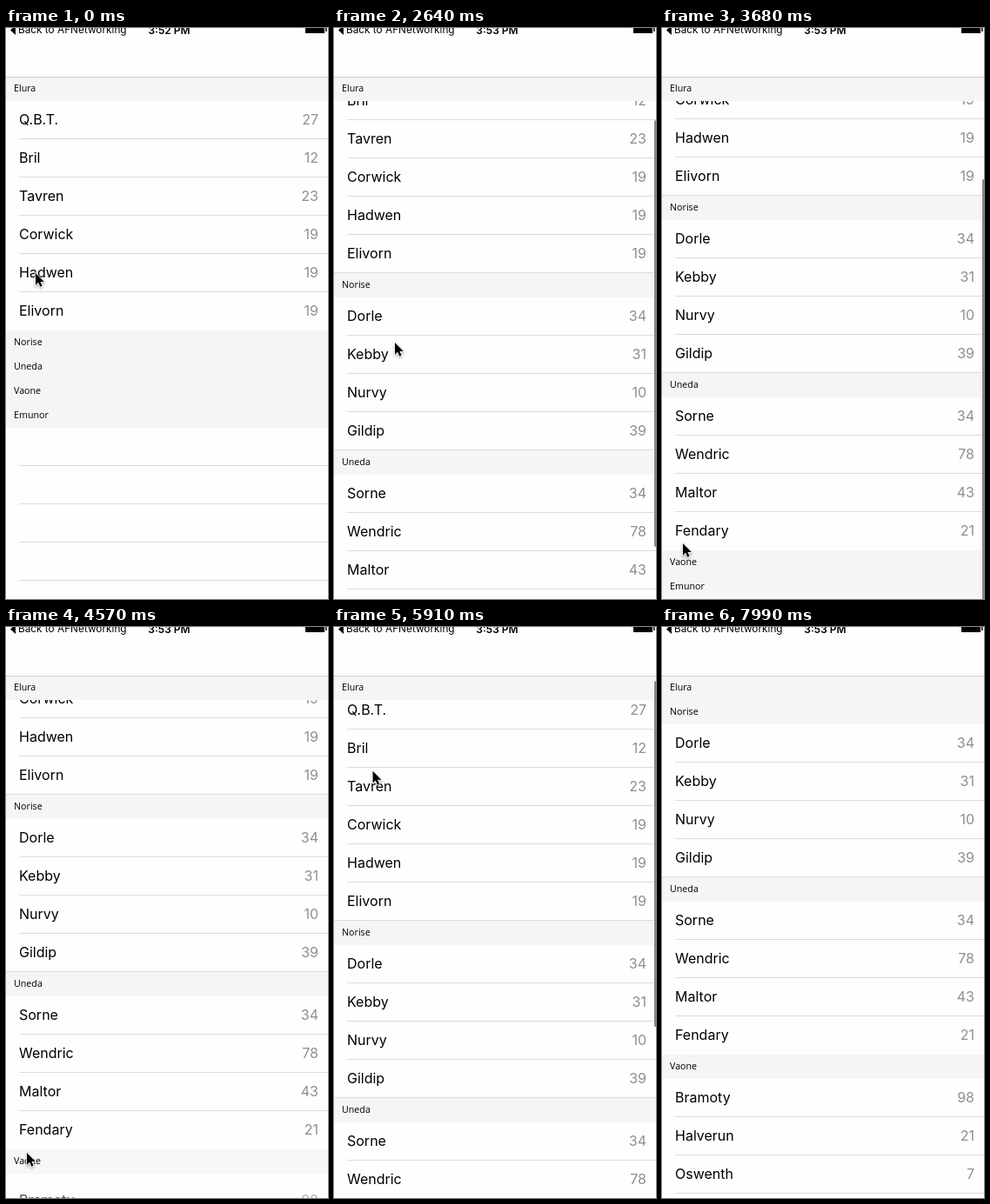
An HTML page with a canvas for the animation above (8.44 s loop, 370 by 657 pixels).

```html
<!DOCTYPE html>
<html lang="en">
<head>
<meta charset="utf-8">
<title>Expandable list</title>
<style>
  html, body { margin: 0; width: 100%; height: 100%; overflow: hidden; background: #fefefe; }
  canvas { display: block; }
</style>
</head>
<body>
<canvas id="stage" width="370" height="657"></canvas>
<script>
const ctx = document.getElementById('stage').getContext('2d');
const W = 370, H = 657, LOOP = 8440, STEP = 148, LAST_STEP = 54;
const BAR = 56, HEAD = 28, ROW = 44;
const PAPER = '#fefefe', LINE = '#dcdcde';

// open and close are the steps at which a section starts to unfold and fold.
const section = (title, open, close, rows) =>
  ({ title, open, close, rows: rows.split(', ').filter(Boolean).map(row => row.split(' ')) });

const sections = [
  section('Elura', -9, 44, 'Q.B.T. 27, Bril 12, Tavren 23, Corwick 19, Hadwen 19, Elivorn 19'),
  section('Norise', 5, Infinity, 'Dorle 34, Kebby 31, Nurvy 10, Gildip 39'),
  section('Uneda', 14, Infinity, 'Sorne 34, Wendric 78, Maltor 43, Fendary 21'),
  section('Vaone', 30, Infinity, 'Bramoty 98, Halverun 21, Oswenth 7, Ambrel 16'),
  section('Emunor', Infinity, Infinity, '')
];

// Each move glides to its goal between two steps.
const move = (from, to, ...goal) => ({ from, to, goal });
const scrollMoves = [move(17, 19, 88), move(20, 25, 155), move(34, 42, 0)];
const cursorMoves = [
  move(0, 3, 31, 350),      // to Norise
  move(6, 8, 59, 452),
  move(8, 12, 33, 560),     // to Uneda
  move(17, 18, 70, 362),    // drag up
  move(21, 25, 24, 593),
  move(25, 28, 24, 605),    // to Vaone
  move(34, 37, 32, 690),    // drag down
  move(37, 42, 47, 66),     // to Elura
  move(44, 46, 222, 377),
  move(47, 54, 374, 667)    // leave
];

const clamp = x => Math.min(1, Math.max(0, x));
const lerp = (a, b, p) => a + (b - a) * p;
const easeOut = x => 1 - (1 - x) ** 2;
const easeInOut = x => x * x * (3 - 2 * x);
const unfold = (k, start) => k < start ? 0 : easeInOut(clamp((k - start + 0.72) / 2.75));

const glide = (origin, moves, k) => moves.reduce((at, { from, to, goal }) => {
  const p = easeOut(clamp((k - from) / (to - from)));
  return at.map((v, i) => lerp(v, goal[i], p));
}, origin);

function rect(x, y, w, h, color) {
  ctx.fillStyle = color;
  ctx.fillRect(x, y, w, h);
}

function text(str, x, y, font, color = '#000', align = 'left') {
  ctx.font = font;
  ctx.fillStyle = color;
  ctx.textAlign = align;
  ctx.fillText(str, x, y);
}

function polygon(points) {
  ctx.beginPath();
  points.forEach(([x, y]) => ctx.lineTo(x, y));
  ctx.closePath();
}

function drawHeader(title, y, tint) {
  rect(0, y, W, HEAD, PAPER);
  ctx.globalAlpha = tint;
  rect(0, y, W, HEAD, '#f5f5f5');
  ctx.globalAlpha = 1;
  text(title, 9, y + 16.5, '10.7px "Open Sans", sans-serif');
}

function drawRows(rows, top, height, shown) {
  ctx.save();
  ctx.beginPath();
  ctx.rect(0, top, W, height);
  ctx.clip();
  ctx.globalAlpha = shown;
  rows.forEach(([name, count], i) => {
    const y = Math.round(lerp(top + 29, top + ROW * i, shown));
    const font = '16px Inter, sans-serif';
    text(name, 15, y + 27, font);
    text(count, 359, y + 27, font, '#8e8e93', 'right');
    if (i < rows.length - 1) rect(15, y + ROW - 1, W, 1, LINE);
  });
  ctx.restore();
}

function drawList(k, scroll) {
  let y = BAR - scroll, previous = 0;
  sections.forEach(({ title, rows, open, close }, i) => {
    const opening = unfold(k, open), closing = unfold(k, close);
    const shown = opening * (1 - closing);
    const height = Math.round(rows.length * ROW * shown);
    if (shown > 0) drawRows(rows, y + HEAD, height, shown);
    drawHeader(title, i ? y : BAR, closing || opening || 1);
    if (i < 3 && previous === 1 && shown > 0) rect(0, y - 1, W, 1, LINE);
    y += HEAD + height;
    previous = shown;
  });
  for (let line = y + ROW - 1; line < H; line += ROW) rect(15, line, W, 1, LINE);
  return y + scroll - BAR;
}

function drawScrollBar(scroll, content) {
  ctx.fillStyle = '#858585';
  ctx.beginPath();
  ctx.roundRect(368, BAR + scroll * 576 / content, 2.5, 609 ** 2 / content, 1.2);
  ctx.fill();
}

function drawTopBar(k) {
  rect(0, 0, W, BAR, PAPER);
  rect(0, BAR, W, 1, '#cfcfd1');
  polygon([[5, 2.5], [11, -3], [11, 8]]);
  ctx.fillStyle = '#000';
  ctx.fill();
  text('Back to AFNetworking', 14, 6, '11.8px Inter, sans-serif');
  text(k < 6 ? '3:52 PM' : '3:53 PM', 187.5, 6.5, '600 12px Inter, sans-serif', '#000', 'center');
  rect(344, 0, 22, 6, '#000');
  rect(367, 0, 1.5, 4, '#000');
}

function drawCursor(x, y) {
  ctx.save();
  ctx.translate(x, y);
  ctx.scale(0.88, 0.88);
  polygon([[0, 0], [0, 15.5], [3.6, 12.2], [6, 18], [8.6, 16.9], [6.2, 11.3], [11.2, 11.3]]);
  ctx.shadowColor = 'rgba(0,0,0,.4)';
  ctx.shadowBlur = 3;
  ctx.shadowOffsetY = 1.5;
  ctx.lineWidth = 1.6;
  ctx.strokeStyle = '#fff';
  ctx.stroke();
  ctx.shadowColor = 'transparent';
  ctx.fillStyle = '#000';
  ctx.fill();
  ctx.restore();
}

function draw(now) {
  // The screen refreshes in steps and rests on the last one.
  const k = Math.min(LAST_STEP, Math.floor((now % LOOP + 25) / STEP));
  const scroll = Math.round(glide([0], scrollMoves, k)[0]);
  rect(0, 0, W, H, PAPER);
  const content = drawList(k, scroll);
  drawTopBar(k);
  if (scrollMoves.some(({ from, to }) => k > from && k <= to + 1)) drawScrollBar(scroll, content);
  drawCursor(...glide([34, 282], cursorMoves, k));
}

const start = performance.now();
function tick() {
  draw(performance.now() - start);
  requestAnimationFrame(tick);
}
tick();
</script>
</body>
</html>
```
